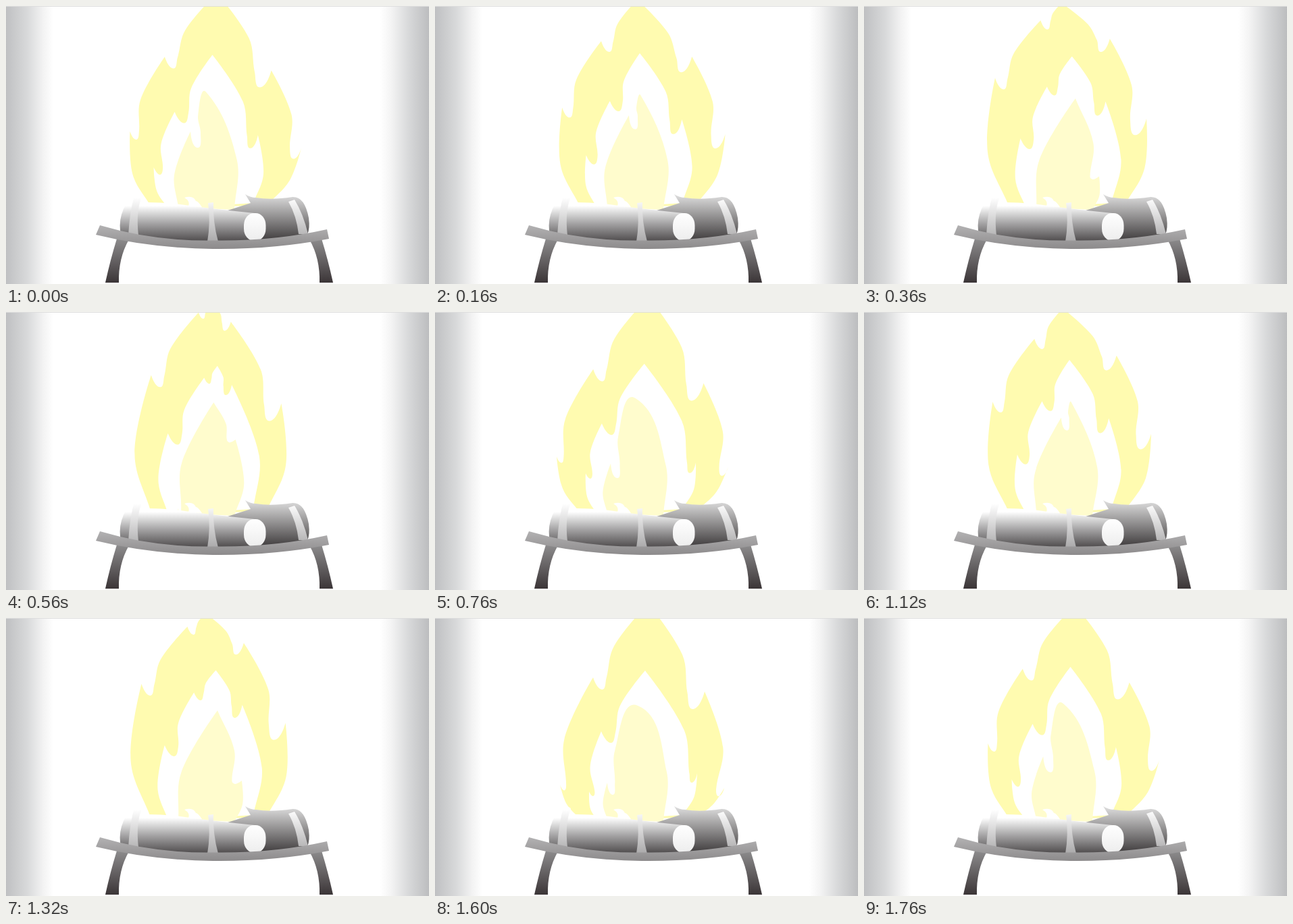
An HTML page for the animation above (1.8 s loop, 626x412 px).

```html
<!DOCTYPE html>
<html lang="en">
<head>
<meta charset="utf-8">
<title>Campfire</title>
<style>
  html, body { margin: 0; width: 100%; height: 100%; overflow: hidden; background: #fff; }
  svg { display: block; width: 626px; height: 412px; }
</style>
</head>
<body>
<svg viewBox="0 0 626 412">
  <defs>
    <linearGradient id="wall">
      <stop offset="0" stop-color="#bfc0c2"/>
      <stop offset=".05" stop-color="#d8d9da"/>
      <stop offset=".09" stop-color="#f4f4f4"/>
      <stop offset=".112" stop-color="#fff"/>
      <stop offset=".885" stop-color="#fff"/>
      <stop offset=".91" stop-color="#f4f4f4"/>
      <stop offset=".95" stop-color="#d9dadb"/>
      <stop offset="1" stop-color="#bcbdbf"/>
    </linearGradient>
    <linearGradient id="front" gradientUnits="userSpaceOnUse" x1="0" y1="296" x2="0" y2="348">
      <stop offset="0" stop-color="#fff"/>
      <stop offset=".5" stop-color="#a5a4a5"/>
      <stop offset="1" stop-color="#514e4f"/>
    </linearGradient>
    <linearGradient id="back" gradientUnits="userSpaceOnUse" x1="0" y1="278" x2="0" y2="344">
      <stop offset="0" stop-color="#e2e2e2"/>
      <stop offset="1" stop-color="#484546"/>
    </linearGradient>
    <linearGradient id="post" gradientUnits="userSpaceOnUse" x1="0" y1="284" x2="0" y2="350">
      <stop offset="0" stop-color="#fff"/>
      <stop offset="1" stop-color="#a9a8a9"/>
    </linearGradient>
    <linearGradient id="bar" gradientUnits="userSpaceOnUse" x1="0" y1="324" x2="0" y2="361">
      <stop offset="0" stop-color="#b4b3b4"/>
      <stop offset="1" stop-color="#8b898a"/>
    </linearGradient>
    <linearGradient id="leg" gradientUnits="userSpaceOnUse" x1="0" y1="345" x2="0" y2="411">
      <stop offset="0" stop-color="#8d8c8d"/>
      <stop offset="1" stop-color="#3a3436"/>
    </linearGradient>
    <linearGradient id="cut" x2="0" y2="1">
      <stop offset="0" stop-color="#fff"/>
      <stop offset="1" stop-color="#ededed"/>
    </linearGradient>
  </defs>

  <rect width="626" height="412" fill="url(#wall)"/>

  <path id="outer" fill="#fffbb0"/>
  <path id="middle" fill="#fff"/>
  <path id="inner" fill="#fffccd"/>

  <rect width="626" height="1" fill="#dedede"/>

  <path fill="url(#back)" d="M328 303L362 292L354 279Q362 284 370 284Q392 288 424 283Q442 282 448 314Q450 330 446 338L380 348L340 330Z"/>
  <path fill="url(#front)" d="M178 293Q205 289 250 293Q305 301 368 307L368 350L290 354L170 338Q165 315 178 293Z"/>
  <path fill="#fff" d="M264 284Q277 280 281 289Q284 289 290 298L270 297Q273 289 264 284Z"/>
  <rect x="352" y="307" width="32.500" height="41" rx="15" ry="18" fill="url(#cut)"/>
  <g fill="url(#post)">
    <path d="M190 281Q195 277 201 282Q192 305 196 340H181Q183 305 190 281Z"/>
    <path d="M299 292L307 291Q306 320 314 349H298Q303 320 299 292Z"/>
    <path d="M418 290L427 287Q440 308 447 338H433Q430 311 418 290Z"/>
  </g>
  <g fill="url(#leg)">
    <path id="leg-shape" d="M164 345L182 346Q166 374 167 410H147Q154.500 376 164 345Z"/>
    <use href="#leg-shape" transform="matrix(-1 0 0 1 631 0)"/>
  </g>
  <path fill="url(#bar)" d="M139 325Q220 349 306 347.500Q395 349 475 331L478 345Q395 361 306 360Q215 359 133 339Z"/>
</svg>

<script>
const STEP = 40, LOOP = 1800;

// Tongues leave the foot, climb along `path` (age in periods, x, y) and melt
// into the crown at age `exit`. `size` is the width and depth of their notch.
const flames = {
  outer: {
    period: 880, from: 720,
    crown: { x: 304, y: -13, swing: [12, -9], lag: .05 },
    left: {
      foot: [215, 298], size: [13, 18], exit: 2,
      path: [[0, 185, 247], [.045, 180, 214], [.2, 184, 182], [.63, 195, 99],
             [1, 234, 88], [1.2, 235, 74], [1.63, 264, 16]]
    },
    right: {
      foot: [385, 296], size: [17, 26], exit: 2,
      path: [[0, 428, 252], [.045, 434, 229], [.2, 438, 206], [.63, 416, 163],
             [1, 399, 109], [1.2, 392, 94], [1.63, 361, 44]]
    }
  },
  middle: {
    period: 880, from: 720,
    crown: { x: 308, y: 75, swing: [5, 5], lag: -.15 },
    left: {
      foot: [240, 300], size: [14, 17], exit: 2,
      path: [[.045, 223, 239], [.2, 218, 239], [.63, 233, 192],
             [1, 246, 168], [1.2, 250, 156], [1.63, 273, 116]]
    },
    right: {
      foot: [366, 292], size: [12, 22], exit: 1,
      path: [[0, 388, 230], [.045, 386, 223], [.2, 371, 187], [.63, 356, 137]]
    }
  },
  inner: {
    period: 920, from: 680, round: true,
    crown: { x: 304, y: 132, swing: [9, 5], lag: .68 },
    left: {
      foot: [255, 298], size: [10, 24], exit: .65,
      path: [[0, 255, 244], [.17, 265, 206], [.26, 273, 186]]
    },
    right: {
      foot: [338, 302], size: [10, 5], exit: 1,
      path: [[.65, 348, 253], [.7, 349, 240], [.9, 338, 180]]
    }
  }
};

const clamp = v => Math.min(1, Math.max(0, v));
const lerp = (a, b, k) => a + (b - a) * k;

function along(keys, age) {
  if (age <= keys[0][0]) return keys[0].slice(1);
  const i = keys.findIndex(k => k[0] > age);
  if (i < 0) return keys[keys.length - 1].slice(1);
  const [t0, x0, y0] = keys[i - 1], [t1, x1, y1] = keys[i];
  const k = (age - t0) / (t1 - t0);
  return [lerp(x0, x1, k), lerp(y0, y1, k)];
}

function tongue({ path, foot, size, exit }, dir, age, crown) {
  const enter = path[0][0] - .15;
  const grow = Math.sqrt(Math.sin(Math.PI * clamp((age - enter) / (exit - enter))));
  const w = size[0] * grow * dir, h = size[1] * grow;
  const tip = along([[enter, ...foot], ...path, [exit, ...crown]], age);
  const valley = [tip[0] - w, tip[1] + h];
  const wall = [valley[0] - w * .5, valley[1] - h * .9];
  return { wall, valley, tip };
}

// The edge between two points swells outwards.
function belly(a, b, dir) {
  const swell = Math.hypot(b[0] - a[0], b[1] - a[1]) * .12;
  return [lerp(a[0], b[0], .57) + dir * swell, lerp(a[1], b[1], .57)];
}

// One edge of a flame, from just below the crown down to the foot.
function edge(side, dir, phase, crown) {
  const nodes = [];
  let above = crown;
  for (let k = Math.ceil(side.exit) - 1; k >= -1; k--) {
    const { wall, valley, tip } = tongue(side, dir, phase + k, crown);
    nodes.push({ p: belly(above, wall, dir) }, { p: wall }, { p: valley }, { p: tip, sharp: true });
    above = tip;
  }
  nodes.push({ p: belly(above, side.foot, dir) }, { p: side.foot, sharp: true });
  return nodes;
}

function smooth(nodes) {
  const handle = (i, to) => {
    const { p, sharp } = nodes[i];
    if (sharp) return p;
    const a = nodes[i - 1].p, b = nodes[i + 1].p, q = nodes[to].p;
    const span = Math.hypot(b[0] - a[0], b[1] - a[1]) || 1;
    const reach = Math.hypot(q[0] - p[0], q[1] - p[1]) * .35 * Math.sign(to - i) / span;
    return [p[0] + (b[0] - a[0]) * reach, p[1] + (b[1] - a[1]) * reach];
  };
  const xy = p => p.map(v => v.toFixed(1)).join(' ');
  let d = 'M' + xy(nodes[0].p);
  for (let i = 1; i < nodes.length; i++) {
    d += 'C' + [handle(i - 1, i), handle(i, i - 1), nodes[i].p].map(xy).join(' ');
  }
  return d + 'Z';
}

function outline({ period, from, crown, round, left, right }, time) {
  const phase = ((time - from + period) % period) / period;
  const sway = Math.cos(2 * Math.PI * (phase - crown.lag));
  const top = [crown.x + crown.swing[0] * sway, crown.y + crown.swing[1] * sway];
  return smooth([
    ...edge(left, -1, phase, top).reverse(),
    { p: top, sharp: !round },
    ...edge(right, 1, phase, top)
  ]);
}

function draw(time) {
  for (const id in flames) {
    document.getElementById(id).setAttribute('d', outline(flames[id], time));
  }
}

const start = performance.now();
function tick() {
  const t = (performance.now() - start) % LOOP;
  draw(Math.floor(t / STEP) * STEP);
  requestAnimationFrame(tick);
}
tick();
</script>
</body>
</html>
```
